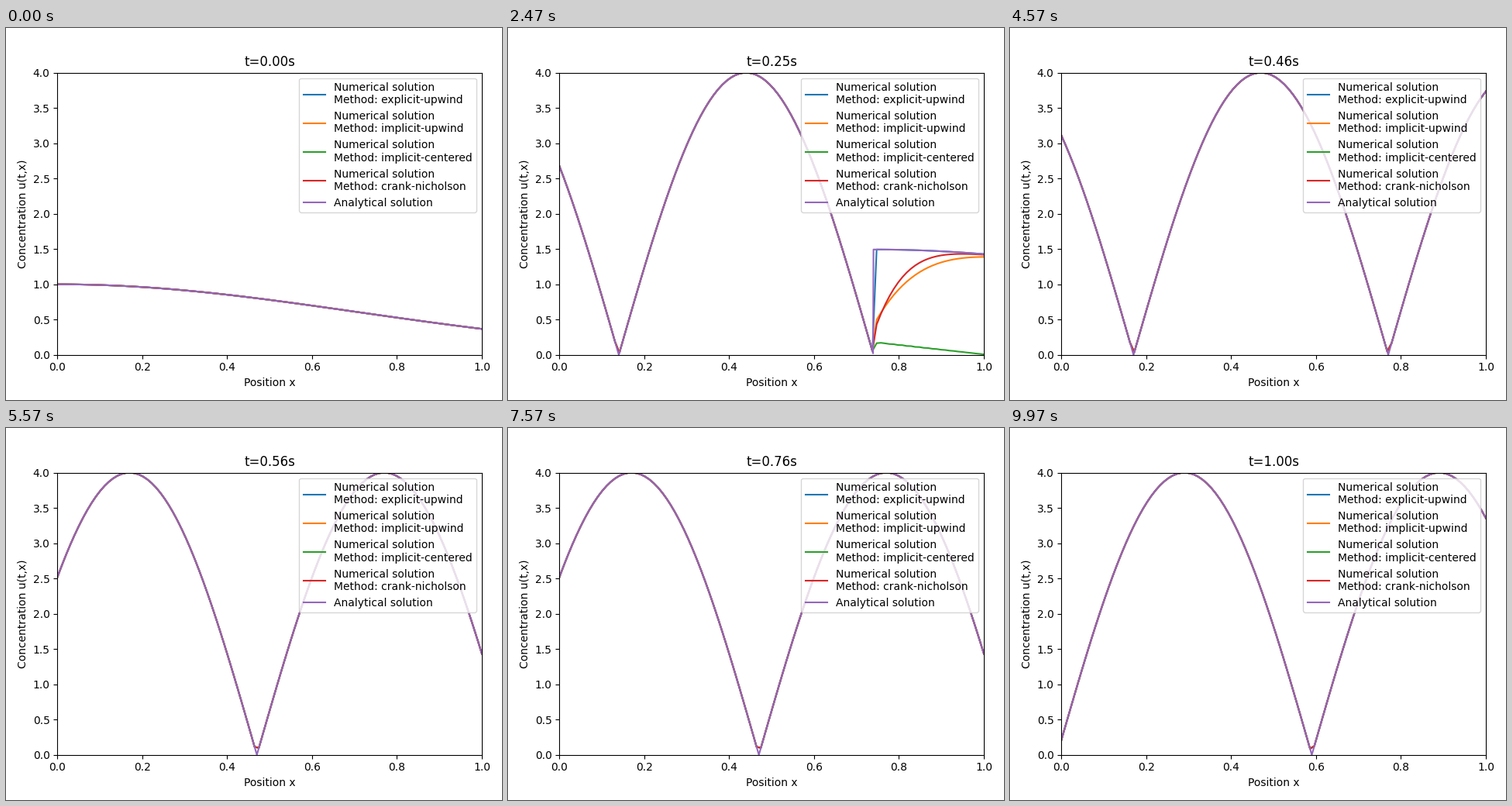
Animation, 640 px wide and 480 px high, one loop 10000 ms. Source, as a matplotlib script:

```python
import numpy as np
import matplotlib.pyplot as plt
from matplotlib.animation import FuncAnimation

# Advection u_t + c u_x = SOURCE on [0, 1], solved with four schemes
SPEED = 3.0
SOURCE = 2.0
STEPS = 300
DT = 1 / STEPS
CELLS = 100
LOOP_MS = 10000


def exact(t, x):
    """Inflow wave behind the front, shifted initial profile ahead of it."""
    inflow = 4 * np.abs(np.sin(5 * np.pi * (t - x / SPEED)))
    ahead = np.exp(-(x - SPEED * t) ** 2) + SOURCE * t
    return np.where(x < SPEED * t, inflow, ahead)


def solve(lhs, rhs):
    """All time levels of lhs @ u_new = rhs @ u_old + source."""
    inverse = np.linalg.inv(lhs)
    u = exact(0, grid)
    levels = [u]
    for n in range(1, STEPS):
        t = n * DT
        u = inverse @ (rhs @ u + DT * SOURCE)
        u = np.where(grid < SPEED * t, exact(t, grid), u)
        levels.append(u)
    return levels


grid = np.linspace(0, 1, CELLS)
fine = np.linspace(0, 1, 1001)

courant = SPEED * DT * (CELLS - 1)
eye = np.eye(CELLS)
left = np.eye(CELLS, k=-1)
right = np.eye(CELLS, k=1)
upwind = courant * (eye - left)
centered = courant / 2 * (left - right)

schemes = {
    "explicit-upwind": (eye, eye - upwind),
    "implicit-upwind": (eye + upwind, eye),
    "implicit-centered": (eye + centered, eye),
    "crank-nicholson": (eye + upwind / 2, eye - upwind / 2),
}
solutions = [solve(*pair) for pair in schemes.values()]

fig, ax = plt.subplots(figsize=(6.4, 4.8), dpi=100)
lines = [
    ax.plot(grid, levels[0], label=f"Numerical solution\nMethod: {name}")[0]
    for name, levels in zip(schemes, solutions)
]
exact_line, = ax.plot(fine, exact(0, fine), label="Analytical solution")
ax.set_xlim(0, 1)
ax.set_ylim(0, 4)
ax.set_xlabel("Position x")
ax.set_ylabel("Concentration u(t,x)")
title = ax.set_title("t=0.00s")
ax.legend(loc="upper right")
fig.tight_layout()
fig.subplots_adjust(top=0.88)


def update(n):
    t = n * DT
    for line, levels in zip(lines, solutions):
        line.set_ydata(levels[n])
    exact_line.set_ydata(exact(t, fine))
    title.set_text(f"t={t:.2f}s")
    return [*lines, exact_line, title]


anim = FuncAnimation(fig, update, frames=STEPS, interval=LOOP_MS / STEPS,
                     repeat=True, repeat_delay=0)
plt.show()
```
